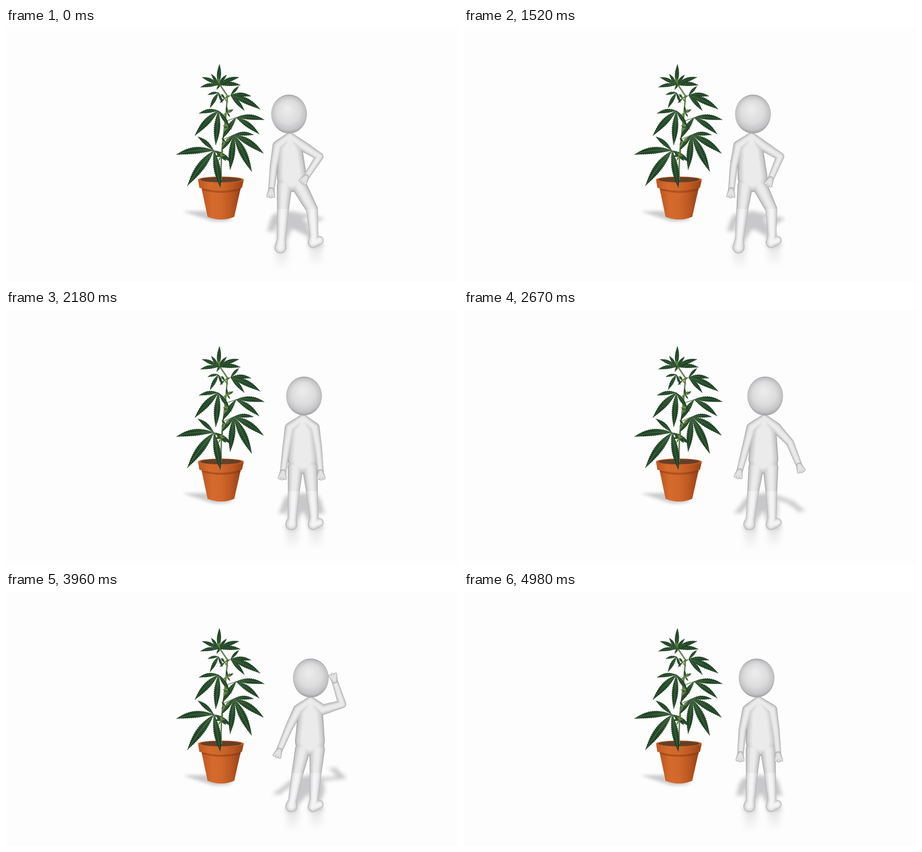
An HTML page with a canvas that plays this animation: 998x561 px, repeating every 5.01 s.

```html
<!DOCTYPE html>
<html lang="en">
<head>
<meta charset="utf-8">
<title>Figure and potted plant</title>
<style>
  html, body { margin: 0; width: 100%; height: 100%; overflow: hidden; background: #fdfdfd; }
  canvas { position: absolute; left: 0; top: 0; }
</style>
</head>
<body>
<canvas id="plant" width="998" height="561"></canvas>
<canvas id="figure" width="998" height="561"></canvas>
<script>
const LOOP = 5010;
const RAD = Math.PI / 180;
const context = id => document.getElementById(id).getContext('2d');
const lerp = (a, b, k) => a + (b - a) * k;

// ---------- plant ----------
const p = context('plant');

let seed = 7;
const random = () => (seed = seed * 16807 % 2147483647) / 2147483647;

function fillPath(d, fill) {
  p.fillStyle = fill;
  p.fill(new Path2D(d));
}

function strokePath(d, color, width) {
  p.strokeStyle = color;
  p.lineWidth = width;
  p.stroke(new Path2D(d));
}

function gradient(x1, y1, x2, y2, colors) {
  const g = p.createLinearGradient(x1, y1, x2, y2);
  colors.forEach((c, i) => g.addColorStop(i / (colors.length - 1), c));
  return g;
}

// Serrated blade along a quadratic curve that arches upwards.
function leaflet(x1, y1, angle, len, young) {
  const x2 = x1 + Math.cos(angle) * len, y2 = y1 + Math.sin(angle) * len;
  const cx = (x1 + x2) / 2, cy = (y1 + y2) / 2 - Math.abs(x2 - x1) * .12;
  const at = (u, side) => {
    const v = 1 - u;
    const x = v * v * x1 + 2 * u * v * cx + u * u * x2;
    const y = v * v * y1 + 2 * u * v * cy + u * u * y2;
    const dx = v * (cx - x1) + u * (x2 - cx), dy = v * (cy - y1) + u * (y2 - cy);
    const w = side * (len * .078 + .6) * Math.sin(Math.PI * u) / Math.hypot(dx, dy);
    return [x - dy * w, y + dx * w];
  };
  const n = Math.max(8, Math.round(len / 2.2));
  const edge = side => Array.from({ length: n + 1 }, (_, i) => at(i / n, side * (i % 2 ? 1.12 : .85)));
  const outline = 'M' + [...edge(1), ...edge(-1).reverse()].join('L') + 'Z';
  const colors = young ? ['#84994f', '#5f7c3d', '#48652f'] : ['#345a33', '#1f4426', '#17361e'];
  fillPath(outline, gradient(x1, y1, x2, y2, colors));
  strokePath(outline, young ? '#6d8a45' : '#142f1a', .6);
  if (young) return;
  strokePath(`M${x1} ${y1}Q${cx} ${cy} ${x2} ${y2}`, '#52774c', Math.max(.6, len / 80));
  for (let u = .15; u < .85; u += 4 / len)
    for (const side of [-.75, .75])
      strokePath(`M${at(u, 0)}L${at(u + .06, side)}`, '#3c603b', .5);
}

// Leaflets spread evenly around a middle angle, the central ones longest.
function fan(x, y, middle, step, count, size) {
  for (let i = 0; i < count; i++) {
    const angle = middle + (i - (count - 1) / 2) * step;
    leaflet(x, y, angle * RAD, size * (.25 + .75 * Math.sin(Math.PI * (i + .5) / count)));
  }
}

function drawPot() {
  const clay = ['#bd5820', '#d66a2d', '#d0672b', '#bd5822', '#984216'];
  p.filter = 'blur(3px)';
  fillPath('M391 405L445 404L502 421Q484 430 454 426Z', '#cbcbcd');
  p.filter = 'none';
  fillPath('M431 350L445 417Q475 429 504 417L519 350Z', gradient(434, 0, 517, 0, clay));
  fillPath('M431 353Q475 366 519 353L518 358Q475 370 433 358Z', '#7c310f66');
  fillPath('M424 335L427 353Q475 363 521 353L525 335Z', gradient(424, 0, 525, 0, clay));
  fillPath('M424 335a50.500 7 0 1 0 101 0a50.500 7 0 1 0 -101 0', '#c96029');
  fillPath('M429 335a45 5.500 0 1 0 91 0a45 5.500 0 1 0 -91 0', '#634028');
}

function drawPlant() {
  drawPot();
  strokePath('M475 336Q474 285 480 240T489 150L470 122', '#668457', 3.2);
  strokePath('M465 335L462 272L476 285M482 245L503 236M485 206L508 198M486 200L469 183', '#668457', 1.5);
  fan(503, 236, 64, 32, 5, 90);
  fan(459, 271, 127, 47, 5, 97);
  fan(508, 198, 20, 31, 2, 80);
  fan(508, 198, 123, 0, 1, 55);
  fan(469, 183, 114, 39, 4, 80);
  fan(496, 149, 25, 23, 3, 72);
  fan(496, 149, -48, 0, 1, 27);
  fan(469, 143, 119, 50, 3, 38);
  fan(469, 126, -87, 36, 3, 46);
  fan(469, 126, -10, 21, 2, 62);
  fan(469, 126, 189, 32, 2, 51);
  for (let i = 0; i < 6; i++)
    for (let k = 0; k < 7; k++)
      leaflet(472 + 18 * Math.sin(i * .6), 124 + i * 32, random() * 6.3, 7 + random() * 9, k % 3 > 0);
}

// ---------- figure ----------
const f = context('figure');

// x of head, chest and pelvis; outward angles of left upper arm and forearm,
// then of the right ones; how far the left foot has stepped forward.
const hip = [625, 627, 631, 11, 6, 58, -33, 1];
const lean = [638, 633, 637, 13, 6, 58, -23, 1];
const stand = [658, 654, 655, 10, 8, 10, 6, 0];
const ready = [665, 662, 661, 16, 15, 43, 22, 0];
const scratch = [673, 672, 671, 27, 23, 106, 198, 0];
const end = [646, 653, 655, 14, 5, 10, 6, 0];

const moves = [
  [760, 1060, lean], [1520, 2010, stand], [2180, 2670, ready],
  [2670, 3070, scratch], [3960, 4550, end]
];

function poseAt(t) {
  return moves.reduce((pose, [from, to, next]) => {
    const k = Math.min(1, Math.max(0, (t - from) / (to - from)));
    return pose.map((v, i) => lerp(v, next[i], k * k * (3 - 2 * k)));
  }, hip);
}

// A tube is a list of [x, y, radius].
function makeArm(chest, side, upper, fore) {
  const reach = ([x, y], angle, len, r) =>
    [x + side * Math.sin(angle * RAD) * len, y + Math.cos(angle * RAD) * len, r];
  const shoulder = [chest + side * 27, 260, 11.5];
  const elbow = reach(shoulder, upper, 45, 9);
  const palm = reach(elbow, fore, 55, 7);
  const fingers = [-28, 0, 26].map(turn => [palm, reach(palm, fore + turn, 14, 3.5)]);
  return { limb: [shoulder, elbow, palm], fingers };
}

function makeLeg(hipX, bend, ankleX, ankleY) {
  return [[hipX, 348, 17], [(hipX + ankleX) / 2 + bend, 400, 13], [ankleX, ankleY, 9.5]];
}

function tubePath(tubes, radius = r => r) {
  const path = new Path2D();
  for (const tube of tubes)
    for (let i = 1; i < tube.length; i++) {
      const a = tube[i - 1], b = tube[i];
      const n = Math.ceil(Math.hypot(b[0] - a[0], b[1] - a[1]) / 2) || 1;
      for (let s = 0; s <= n; s++) {
        const [x, y, r] = a.map((v, j) => lerp(v, b[j], s / n));
        path.moveTo(x + radius(r), y);
        path.arc(x, y, radius(r), 0, 7);
      }
    }
  return path;
}

// Nested fills from a dark rim to a light core give rounded shading.
function shade(tubes, rim, core) {
  for (let k = 0; k <= 1; k += .125) {
    const v = Math.round(lerp(rim, core, Math.sqrt(k)));
    f.fillStyle = `rgb(${v},${v},${v + 1})`;
    f.fill(tubePath(tubes, r => r - Math.min(r * .7, 14) * k));
  }
}

function drawFigure(t) {
  const [head, chest, pelvis, upL, foreL, upR, foreR, step] = poseAt(t);
  const armL = makeArm(chest, -1, upL, foreL), armR = makeArm(chest, 1, upR, foreR);
  const neck = [lerp(head, chest, .6), 239, 9];
  const footX = 632 - 24 * step, footY = 462 + 4 * step;
  const legs = [
    [...makeLeg(pelvis - 16, 0, footX, footY), [footX - 2, footY + 11 + 8 * step, 13]],
    [...makeLeg(pelvis + 16, 12 * step, 680, 458), [678, 474, 11.5], [692, 469, 9.5]]
  ];
  const body = [
    [neck, [chest, 272, 28], [pelvis, 329, 33]],
    ...[armL, armR].flatMap(arm => [[neck, arm.limb[0]], arm.limb]),
    ...legs
  ];
  const hands = [...armL.fingers, ...armR.fingers];

  f.clearRect(0, 0, 998, 561);

  // Ground shadow: the body laid flat.
  f.save();
  f.filter = 'blur(4px)';
  f.setTransform(1, 0, 0, .31, 0, 333);
  f.fillStyle = '#c8c8ca';
  f.fill(tubePath([...body, ...hands]));
  f.restore();

  // Faint floor reflection of the feet.
  f.save();
  f.filter = 'blur(6px)';
  for (const [x, y] of [[footX, footY + 12], [684, 472]]) {
    const g = f.createLinearGradient(0, y, 0, y + 55);
    g.addColorStop(0, '#a0a0a450');
    g.addColorStop(1, '#a0a0a400');
    f.fillStyle = g;
    f.fillRect(x - 13, y, 27, 55);
  }
  f.restore();

  shade(body, 168, 235);
  shade(hands, 160, 228);

  // The lower legs are lit more brightly.
  f.save();
  f.beginPath();
  f.rect(0, 400, 998, 161);
  f.clip();
  shade(legs, 184, 244);
  f.restore();

  const g = f.createRadialGradient(head - 4, 178, 4, head, 190, 43);
  g.addColorStop(0, '#ebebec');
  g.addColorStop(.55, '#dcdcdd');
  g.addColorStop(.85, '#c4c4c6');
  g.addColorStop(1, '#9e9ea1');
  f.fillStyle = g;
  f.beginPath();
  f.ellipse(head, 190, 39.5, 43, 0, 0, 7);
  f.fill();
}

drawPlant();
const start = performance.now();
function frame() {
  drawFigure((performance.now() - start) % LOOP);
  requestAnimationFrame(frame);
}
frame();
</script>
</body>
</html>
```
